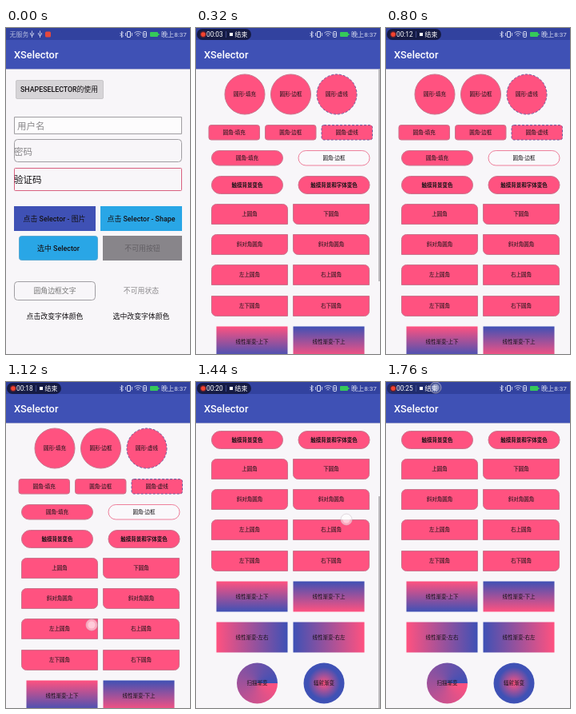
An HTML page with a canvas that plays this animation: 230 px wide and 408 px high, repeating every 1920 ms.

```html
<!DOCTYPE html>
<html lang="zh-CN">
<meta charset="utf-8">
<style>
html, body { margin: 0; width: 100%; height: 100%; overflow: hidden }
canvas { display: block; width: 230px; height: 408px }
</style>
<canvas id="stage" width="230" height="408"></canvas>
<script>
const c = document.getElementById('stage').getContext('2d');
const PINK = '#ff5280', BLUE = '#3f51b5', SKY = '#29a6e6', GREY = '#8a888b', INK = '#141114';
const RIM = '#c9748c', EDGE = '#a09ea2';
const STEP = 160, LOOP = 1920;
const seconds = [0, 1, 3, 5, 8, 12, 15, 18, 19, 20, 22, 25];
const scrolls = [0, 0, 0, 0, 0, 0, 0, 0, 54, 124, 124, 124];
const touches = { 7: [107, 304], 8: [146, 249], 9: [188, 172], 11: [62, 7] };

function text(s, x, y, size, color = INK, align = 'center', weight = 400) {
  c.font = `${weight} ${size}px Roboto, "Noto Sans CJK SC", "Noto Sans CJK", sans-serif`;
  c.textAlign = align;
  c.fillStyle = color;
  c.fillText(s, x, y + size * .37);
}

function paint(fill, stroke, dash = []) {
  if (fill) { c.fillStyle = fill; c.fill(); }
  if (stroke) {
    c.strokeStyle = stroke;
    c.lineWidth = 1;
    c.setLineDash(dash);
    c.stroke();
    c.setLineDash([]);
  }
}

function box(x, y, w, h, r, fill, stroke, dash) {
  c.beginPath();
  c.roundRect(x, y, w, h, r);
  paint(fill, stroke, dash);
}

function disc(x, y, r, fill, stroke, dash) {
  c.beginPath();
  c.arc(x, y, r, 0, 7);
  paint(fill, stroke, dash);
}

function label(s, x, y, w, h, r, fill, stroke, dash, color, weight) {
  box(x, y, w, h, r, fill, stroke, dash);
  text(s, x + w / 2, y + h / 2, 6.5, color, 'center', weight);
}

function blend(gradient, first, last) {
  gradient.addColorStop(0, first);
  gradient.addColorStop(1, last);
  return gradient;
}

function formScreen() {
  box(12.5, 65.5, 109, 23, 1.5, '#d6d4d7', '#c9c7ca');
  text('SHAPESELECTOR的使用', 66.5, 77, 8.8, INK, 'center', 500);
  box(10.5, 111.5, 209, 21, 0, '#fdfcfd', EDGE);
  text('用户名', 14, 122.5, 11.5, GREY, 'left');
  box(10.5, 139.5, 209, 28, 4, null, EDGE);
  text('密码', 10, 154.5, 11.5, GREY, 'left');
  box(10.5, 175.5, 209, 28, 1, null, '#d8607f');
  text('验证码', 10, 189.5, 11.5, INK, 'left');

  box(10, 223, 102, 31, 0, BLUE);
  box(118, 223, 102, 31, 0, SKY);
  box(16.5, 260.5, 98, 30, 3, SKY, '#5aa9d2');
  box(121, 260, 99, 31, 0, '#88858a');
  text('点击 Selector - 图片', 60.5, 239, 8.9, INK, 'center', 500);
  text('点击 Selector - Shape', 169, 239, 8.9, INK, 'center', 500);
  text('选中 Selector', 65.5, 276, 8.9, INK, 'center', 500);
  text('不可用按钮', 170.5, 276, 8.9, '#615e63');

  box(10.5, 317.5, 101, 23, 4, null, EDGE);
  text('圆角边框文字', 61, 329, 8.9, '#777');
  text('不可用状态', 169, 329, 8.9, GREY);
  text('点击改变字体颜色', 61, 360.5, 8.9);
  text('选中改变字体颜色', 169, 360.5, 8.9);
}

function shapeScreen(frame) {
  const scroll = scrolls[frame];
  const dash = [3, 2], dashColor = '#6c5a9c';
  c.save();
  c.translate(0, -scroll);

  ['填充', '边框', '虚线'].forEach((name, i) => {
    const stroke = i == 2 ? dashColor : RIM;
    const pattern = i == 2 ? dash : [];
    disc(61 + i * 57.5, 83, 25, PINK, stroke, pattern);
    text('圆形-' + name, 61 + i * 57.5, 83, 6.5);
    label('圆角-' + name, 16 + i * 70.5, 121.5, 63.5, 18.5, 3, PINK, stroke, pattern);
  });
  label('圆角-填充', 19.5, 153.5, 89, 18.5, 9.5, PINK, RIM);
  label('圆角-边框', 128, 153.5, 89, 18.5, 9.5, '#faf8fb', '#ee7f9b');

  ['触摸背景变色', '触摸背景和字体变色'].forEach((name, i) => {
    const pressed = frame == 4 + i * 2;
    label(name, 19.5 + i * 108.5, 185.5, 89, 22, 11, pressed ? BLUE : PINK, RIM, [],
      pressed && i ? '#fff' : INK, 700);
  });

  [['上圆角', [6, 6, 0, 0]], ['下圆角', [0, 0, 6, 6]],
   ['斜对角圆角', [6, 0, 6, 0]], ['斜对角圆角', [0, 6, 0, 6]],
   ['左上圆角', [6, 0, 0, 0]], ['右上圆角', [0, 6, 0, 0]],
   ['左下圆角', [0, 0, 0, 6]], ['右下圆角', [0, 0, 6, 0]]
  ].forEach(([name, radii], i) =>
    label(name, 19.5 + i % 2 * 102, Math.floor((i >> 1) * 38.4) + 220.5, 95, 25, radii, PINK, RIM));

  ['上下', '下上', '左右', '右左'].forEach((way, i) => {
    const x = 25.5 + i % 2 * 96, y = i < 2 ? 373.5 : 424.5;
    const g = i < 2 ? c.createLinearGradient(0, y, 0, y + 38) : c.createLinearGradient(x, 0, x + 89, 0);
    label('线性渐变-' + way, x, y, 89, 38, 0, i % 2 ? blend(g, BLUE, PINK) : blend(g, PINK, BLUE));
  });
  disc(76.5, 501, 25.5, blend(c.createConicGradient(0, 76.5, 501), PINK, BLUE));
  text('扫描渐变', 76.5, 501, 6.5);
  disc(160, 501, 25.5, blend(c.createRadialGradient(160, 501, 0, 160, 501, 20), PINK, BLUE));
  text('辐射渐变', 160, 501, 6.5);
  c.restore();

  if (frame == 2 || frame > 7 && frame < 11)
    box(228, 52 + scroll * 91 / 124, 2, 265, 0, '#bdbbbf');
}

function line(points, color = '#dfe3f5') {
  c.beginPath();
  points.forEach(([x, y]) => c.lineTo(x, y));
  c.strokeStyle = color;
  c.lineWidth = .8;
  c.stroke();
}

function statusBar(frame) {
  box(0, 0, 230, 15, 0, '#32429f');
  box(0, 15, 230, 36, 0, BLUE);
  box(0, 51, 230, 1, 0, '#a9acd0');
  text('XSelector', 10, 33.5, 12.8, '#fff', 'left', 500);

  line([[142.5, 6], [146.5, 10], [144.5, 12], [144.5, 4], [146.5, 6], [142.5, 10]]);
  box(151.5, 4.5, 4, 7, .5, null, '#dfe3f5');
  line([[149.5, 6], [149.5, 10]]);
  line([[157.5, 6], [157.5, 10]]);
  for (const r of [2, 4.5, 7]) {
    c.beginPath();
    c.arc(165, 11.5, r, -2.3, -.85);
    c.strokeStyle = '#dfe3f5';
    c.stroke();
  }
  box(171.5, 4.5, 4, 7, 1, null, '#dfe3f5');
  line([[173.5, 6], [173.5, 10]]);
  box(180, 5, 10, 6, 1, '#35c95a');
  box(190, 7, 1.5, 2, 0, '#35c95a');
  text('晚上8:37', 194, 8, 8.1, '#d5d9ef', 'left');

  if (!frame) {
    text('无服务', 4.5, 8, 8, '#b0b8de', 'left');
    for (const x of [32.5, 42.5]) {
      line([[x, 3.5], [x, 12]]);
      line([[x - 2, 6], [x - 2, 8], [x, 10], [x + 2, 8], [x + 2, 6]]);
    }
    box(49, 4.5, 7, 7, 1.5, '#e5483d');
    return;
  }
  const last = frame == 11;
  if (last) text('无', 4.5, 8, 8, '#8c93bd', 'left');
  box(1, 1, 68, 14, 7, last ? '#1a2358b0' : '#151b45');
  disc(9, 8, 4.2, '#5a2030');
  disc(9, 8, 2.8, '#f4432f');
  text('00:' + String(seconds[frame]).padStart(2, '0'), 13, 8, 8.3, '#fff', 'left');
  line([[37.5, 4], [37.5, 12]], '#46529a');
  box(42, 6, 4, 4, 0, '#fff');
  text('结束', 48.5, 8, 7.9, '#fff', 'left');
}

function draw(now) {
  const frame = Math.floor(now % LOOP / STEP);
  box(0, 0, 230, 408, 0, '#f8f6f9');
  if (frame < 2) formScreen();
  else shapeScreen(frame);
  statusBar(frame);
  const touch = touches[frame];
  if (touch) {
    disc(...touch, 7, frame == 11 ? '#8fa0e066' : '#ffffff80', '#d0c4cc99');
    disc(...touch, 4.5, '#ffffff66');
  }
  requestAnimationFrame(draw);
}
requestAnimationFrame(draw);
</script>
</html>
```
